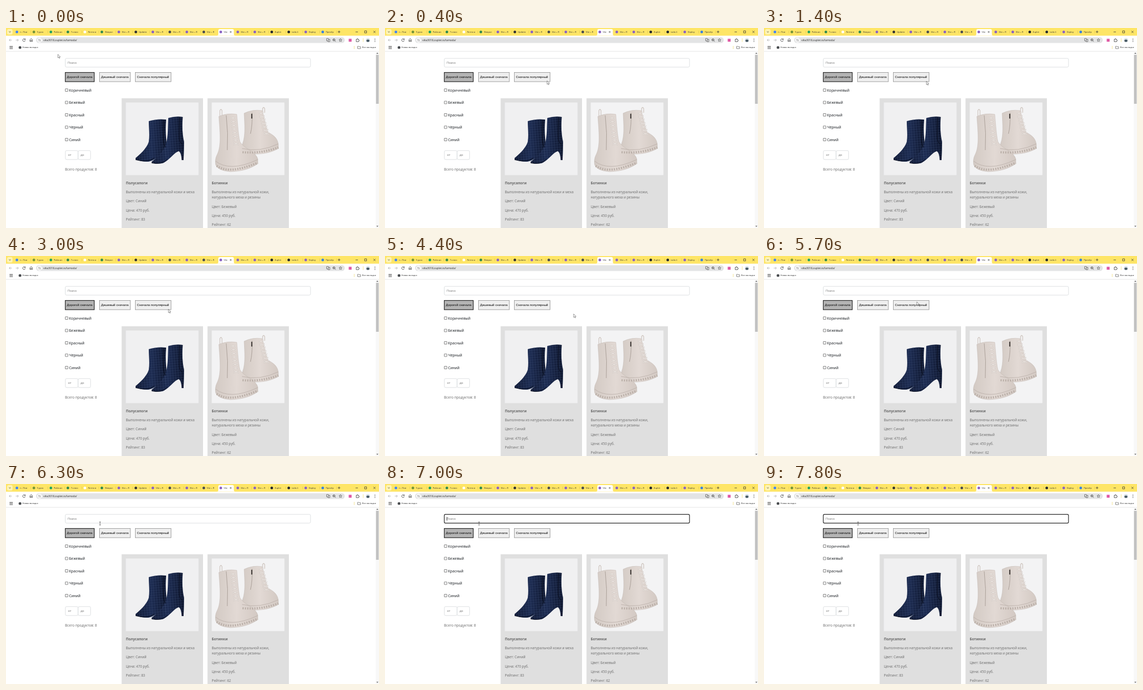
An HTML page that plays this animation: 708x380 px, repeating every 8 s.

```html
<!DOCTYPE html>
<html lang="ru">
<head>
<meta charset="utf-8">
<title>Каталог обуви</title>
<style>
html, body { margin: 0; width: 100%; height: 100%; overflow: hidden; background: #fff }
svg { display: block }
text { font-family: "Noto Sans", "Open Sans", sans-serif; white-space: pre }
.ui text { font-size: 4.1px; fill: #333 }
.button { font: 6.15px "Liberation Sans", Arial, sans-serif; fill: #000 }
.label { font-size: 6.75px; fill: #212529 }
.hint { font-size: 5.8px; fill: #757575 }
.info { font-size: 6.45px; fill: #707070 }
.total { font-size: 6.6px }
.bold { font-size: 6.7px; font-weight: 700; fill: #666 }
.line { fill: none; stroke: #333; stroke-width: .8 }
.field { fill: #fff; stroke: #d4d7da; stroke-width: .8 }
.focus { stroke: #222; stroke-width: 1.2 }
</style>
</head>
<body>
<svg id="stage" width="708" height="380" viewBox="0 0 708 380">
  <defs>
    <pattern id="scales" width="5" height="4.6" patternUnits="userSpaceOnUse" patternTransform="rotate(-4)">
      <path d="M0 .3H5M.4 0V4.6" stroke="#38496f" stroke-width=".4"/>
    </pattern>
    <linearGradient id="navy">
      <stop stop-color="#121b36"/><stop offset=".5" stop-color="#1d2c52"/><stop offset="1" stop-color="#0e162d"/>
    </linearGradient>
    <linearGradient id="cream">
      <stop stop-color="#d3cac4"/><stop offset=".5" stop-color="#e2d9d4"/><stop offset="1" stop-color="#d3c9c3"/>
    </linearGradient>
  </defs>
  <rect width="708" height="380" fill="#fff"/>

  <g id="chrome" class="ui">
    <rect width="708" height="14.6" fill="#fee566"/>
    <rect x="2" y="2" width="10.5" height="10.5" rx="3.5" fill="#fff3b3"/>
    <path class="line" d="M5.6 6.5l1.7 1.7 1.7-1.7"/>
    <path d="M400 14.6q3 0 3-3V5q0-3 3-3h23.5q3 0 3 3v6.6q0 3 3 3z" fill="#fff"/>
    <path class="line" d="M425 6l3 3m0-3l-3 3M629.8 7.3h4.800m-2.400-2.400v4.800M663.500 7.500h4.500M680.700 5.500h3.800v3.800h-3.800zM697.500 5.500l3.800 3.800m0-3.800l-3.800 3.800"/>
    <rect x="57" y="17.500" width="586" height="11" rx="5.500" fill="#e3e4e5"/>
    <circle cx="63.700" cy="23" r="4.400" fill="#fff"/>
    <path class="line" d="M61.500 21.800h2.300m1 0h1M61.500 24.300h1m1 0h2.300"/>
    <path class="line" style="stroke:#aaa" d="M11 23H6m2.300-2.300L6 23l2.300 2.300M18.500 23h5m-2.300-2.300l2.300 2.300-2.300 2.300"/>
    <path class="line" d="M36 21.400a2.500 2.500 0 1 0 .6 2.300m0-3.600v2h-2M45.500 25.500v-3.300l2.300-2 2.300 2v3.300h-1.500v-1.800h-1.600v1.800z"/>
    <text x="71" y="24.800" style="font-size:5px">vika3018.zuplet.io/lamoda/</text>
    <path class="line" style="stroke-width:.6" d="M608.500 20h3.500v4.500h-3.500zM612 21.500h2.700v4.500h-3.500v-1.500M624.200 24.200l1.900 1.900M621 22.500h2.400"/>
    <circle class="line" cx="622.500" cy="22.500" r="2"/>
    <path class="line" style="stroke-width:.6" d="M634.800 20l.8 1.900 2 .2-1.500 1.400.4 2-1.700-1-1.700 1 .4-2-1.500-1.400 2-.2z"/>
    <rect x="650.500" y="20.500" width="5.500" height="5.500" fill="#df5ba5"/>
    <path class="line" d="M664.800 21.500h1.500q-.2-1.400.8-1.400t.8 1.400h1.500v1.400q1.300 0 1.300.9t-1.300.9v1.300h-4.600z"/>
    <path d="M678 19.500v7M661 34v6" stroke="#f2dc72" stroke-width=".8"/>
    <circle cx="687" cy="23" r="3.700" fill="#d5dfe4"/>
    <path d="M684 25q0-3 3-3t3 3q-3 3-6 0z" fill="#475963"/>
    <path d="M700.300 20.300v6" stroke="#333" stroke-width="1.100" stroke-dasharray="1.100 1.300"/>
    <path d="M7 35h5.500m-5.500 2.200h5.500M7 39.400h5.500" stroke="#333" stroke-width="1.300" stroke-dasharray="1.300 .8"/>
    <circle cx="26.600" cy="37" r="2.600" fill="#4a4d50"/>
    <text x="31.200" y="38.400">Новая вкладка</text>
    <path class="line" style="stroke-width:.6" d="M667.500 34.800h2l.8.8h2.700v3.600h-5.500z"/>
    <text x="676" y="38.400">Все закладки</text>
    <path d="M0 44.300H708" stroke="#dcdcdc" stroke-width=".7"/>
  </g>

  <g id="page">
    <rect x="701.800" y="44.600" width="6.200" height="336" fill="#f8f8f8"/>
    <rect x="702.300" y="51" width="5.100" height="93" fill="#c1c1c1"/>
    <path d="M703 49l1.900-2.200 1.900 2.200zM703 375.800l1.900 2.200 1.900-2.200z" fill="#666"/>
    <rect id="search" class="field" x="112.500" y="57.700" width="465.500" height="16.600" rx="2.300"/>
    <text class="hint" x="117" y="68.100">Поиск</text>
    <path id="caret" d="M117.700 62.700v6.800" stroke="#000" stroke-width=".8"/>
    <rect class="field" x="112.700" y="232.900" width="24" height="17" rx="2.300"/>
    <rect class="field" x="136.900" y="232.900" width="23.700" height="17" rx="2.300"/>
    <text class="hint" x="117.800" y="243.200">от</text>
    <text class="hint" x="141.500" y="243.200">до</text>
    <text class="info total" x="112" y="271.300">Всего продуктов: 8</text>
  </g>

  <g id="cards"></g>

  <g id="navyBoots">
    <rect x="227.500" y="141.500" width="138" height="138" fill="#f0f0f1"/>
    <g id="navyShapes">
      <path d="M271 177Q287 172 304 174C302 195 304 212 306 228L304.500 246H302L299 236C291 241 284 252 270 254Q256 254 246 250V247C256 239 268 227 271 216C273 203 271 190 271 177Z"/>
      <path d="M308 171Q322 167 335.500 169C334 188 335 204 338 216C338 230 337.500 240 337 251H333.500C333 243 332 237 328 234C318 237 310 252 297 257Q286 259 276.500 256V254C288 246 301 232 304 219C308 204 307 190 308 171Z"/>
    </g>
    <path d="M299 175v40q1 8 4 12M329 169.500v42q2 8 6 10M246 250.300q22 6 35-3M276.500 256.500q18 4 30-7" fill="none" stroke="#080d1c"/>
  </g>

  <g id="creamBoots">
    <rect x="390.500" y="141.500" width="138" height="138" fill="#f3f3f4"/>
    <g fill="url(#cream)" stroke="#bfb4ae" stroke-width=".5">
      <path d="M452 162Q468 154 486 157C491 174 492 188 497 198C507 203 516 209 517 222V229C501 238 480 242 449 238Q446 230 449 220C455 204 453 183 452 162Z"/>
      <path d="M404 168Q420 161 438 164C440 185 441 203 444 216C452 230 474 234 478 249V258C464 267 450 272 426 273Q402 271 398 260Q396 249 401 240C409 224 406 196 404 168Z"/>
    </g>
    <path d="M398 253q12 10 32 10t48-13M448 229q34 8 69-9" fill="none" stroke="#b8ada6" stroke-width=".8"/>
    <path d="M400 262q12 8 30 7t48-13M449 236q34 3 68-9" fill="none" stroke="#b8ada6" stroke-width="4" stroke-dasharray="2 2.500"/>
    <path d="M467 161q1 24-3 40M418 166q4 34 2 66" fill="none" stroke="#9c918a" stroke-width=".8"/>
    <path d="M406 167v-10q2-5 4 0v9M487 159v-6q2-4 4 0v8" fill="none" stroke="#cfc6c0" stroke-width="1.300"/>
    <path d="M466.500 163v9" stroke="#25201e" stroke-width="1.800"/>
    <g id="laces" fill="none"></g>
  </g>

  <g id="pointer">
    <path id="arrow" d="M0 0V6.600L1.600 5.300 2.700 7.700 3.700 7.200 2.600 4.900H4.700Z" fill="#fff" stroke="#333" stroke-width=".5"/>
    <path id="beam" class="line" style="stroke-width:.6" d="M-1.500-3h3M0-3V3M-1.500 3h3"/>
  </g>
</svg>
<script>
const el = id => document.getElementById(id);
const add = (id, markup) => el(id).insertAdjacentHTML('beforeend', markup);
const text = (x, y, cls, s) => `<text class="${cls}" x="${x}" y="${y}">${s}</text>`;

// Browser tabs: title and icon colour
const vite = ['Vite + R', '#8a63c4'], globe = ['Vite + R', '#4a4d50'], drive = '#318b50';
const tabs = [
  ['п - Пои', '#4285f4'], ['9 урок', '#74953a'], ['Рабочие', '#20a464'],
  ['7 класс', drive], ['Лента м', '#fff'], ['Феврал', drive],
  vite, ['Updatin', '#333'], vite, globe, vite, globe, vite, vite, vite,
  ['Zuplet', '#24292e'], ['todo-li', '#24292e'], ['Deploy', vite[1]], ['Преобр', '#3a83df']
];
tabs.forEach(([title, color], i) => {
  const x = 20.7 + 32.25 * i, active = i === 12;
  add('chrome', `<circle cx="${x}" cy="7.4" r="2.5" fill="${color}"/>
    <svg x="${x + 5.5}" width="${active ? 7 : 16}" height="14">${text(0, 8.9, '', title)}</svg>`);
  if (i !== 11 && !active) add('chrome', `<path d="M${x + 26.5} 5v5" stroke="#d8bd43" stroke-width=".5"/>`);
});

// Sort buttons and colour filters
[[112, 56, 'Дорогой сначала'], [177, 59.5, 'Дешевый сначала'], [245, 68.7, 'Сначала популярный']]
  .forEach(([x, w, label], i) => add('page',
    `<rect x="${x + .5}" y="84.5" width="${w - 1}" height="17.5" fill="${i ? '#efefef' : '#b4b4b4'}"
      stroke="${i ? '#888' : '#222'}" stroke-width="${i ? .8 : 1.2}"/>` + text(x + 3.5, 95.2, 'button', label)));
['Коричневый', 'Бежевый', 'Красный', 'Чёрный', 'Синий'].forEach((name, i) => {
  const y = 120.9 + 23.5 * i;
  add('page', `<rect x="112.5" y="${y - 5.4}" width="5" height="5" rx=".4" fill="#fff" stroke="#666" stroke-width=".8"/>`
    + text(119.7, y, 'label', name));
});

function card(x, title, about, facts) {
  add('cards', `<rect x="${x}" y="133.5" width="154.5" height="247" fill="#dfdfdf"/>`
    + text(x + 8, 296.8, 'info bold', title)
    + about.map((s, i) => text(x + 8, 313.9 + 10.5 * i, 'info', s)).join('')
    + facts.map((s, i) => text(x + 8, 320.8 + 10.5 * about.length + 17.3 * i, 'info', s)).join(''));
}
card(219.5, 'Полусапоги', ['Выполнены из натуральной кожи и меха'],
  ['Цвет: Синий', 'Цена: 470 руб.', 'Рейтинг: 83']);
card(382.5, 'Ботинки', ['Выполнены из натуральной кожи,', 'натурального меха и резины'],
  ['Цвет: Бежевый', 'Цена: 450 руб.', 'Рейтинг: 62']);

// Leather texture and laces
const shapes = el('navyShapes'), leather = shapes.cloneNode(true);
leather.removeAttribute('id');
shapes.setAttribute('fill', 'url(#navy)');
leather.setAttribute('fill', 'url(#scales)');
shapes.after(leather);

function lace(x, y) {
  const d = `M${x} ${y}l10 4m0-4l-10 4`;
  add('laces', `<path d="${d}" stroke="#b5aaa4" stroke-width="1.8"/><path d="${d}" stroke="#f2ede9" stroke-width="1.2"/>`);
}
for (let i = 0; i < 8; i++) {
  lace(426 + i * .8, 169 + i * 7);
  if (i < 7) lace(479 + i * 1.7, 160 + i * 6.5);
}

// Pointer stops: start time, x, y, text cursor
const stops = [
  [0, 98.5, 50], [100, 136, 56], [200, 170, 62, 1], [400, 307.6, 100.3], [1400, 308.2, 101],
  [4400, 358, 110], [4500, 407.5, 117.7], [5000, 451, 109.7], [5300, 408.3, 100.3],
  [5700, 290, 87], [5800, 178.5, 75, 1]
];
function draw(now) {
  const t = now % 8000, focused = t >= 7000;
  const [, x, y, beam] = stops.findLast(s => s[0] <= t);
  el('pointer').setAttribute('transform', `translate(${x} ${y})`);
  el('arrow').style.display = beam ? 'none' : '';
  el('beam').style.display = beam ? '' : 'none';
  el('caret').style.display = focused && t < 7800 ? '' : 'none';
  el('search').classList.toggle('focus', focused);
}
function loop() {
  draw(performance.now());
  requestAnimationFrame(loop);
}
loop();
</script>
</body>
</html>
```
